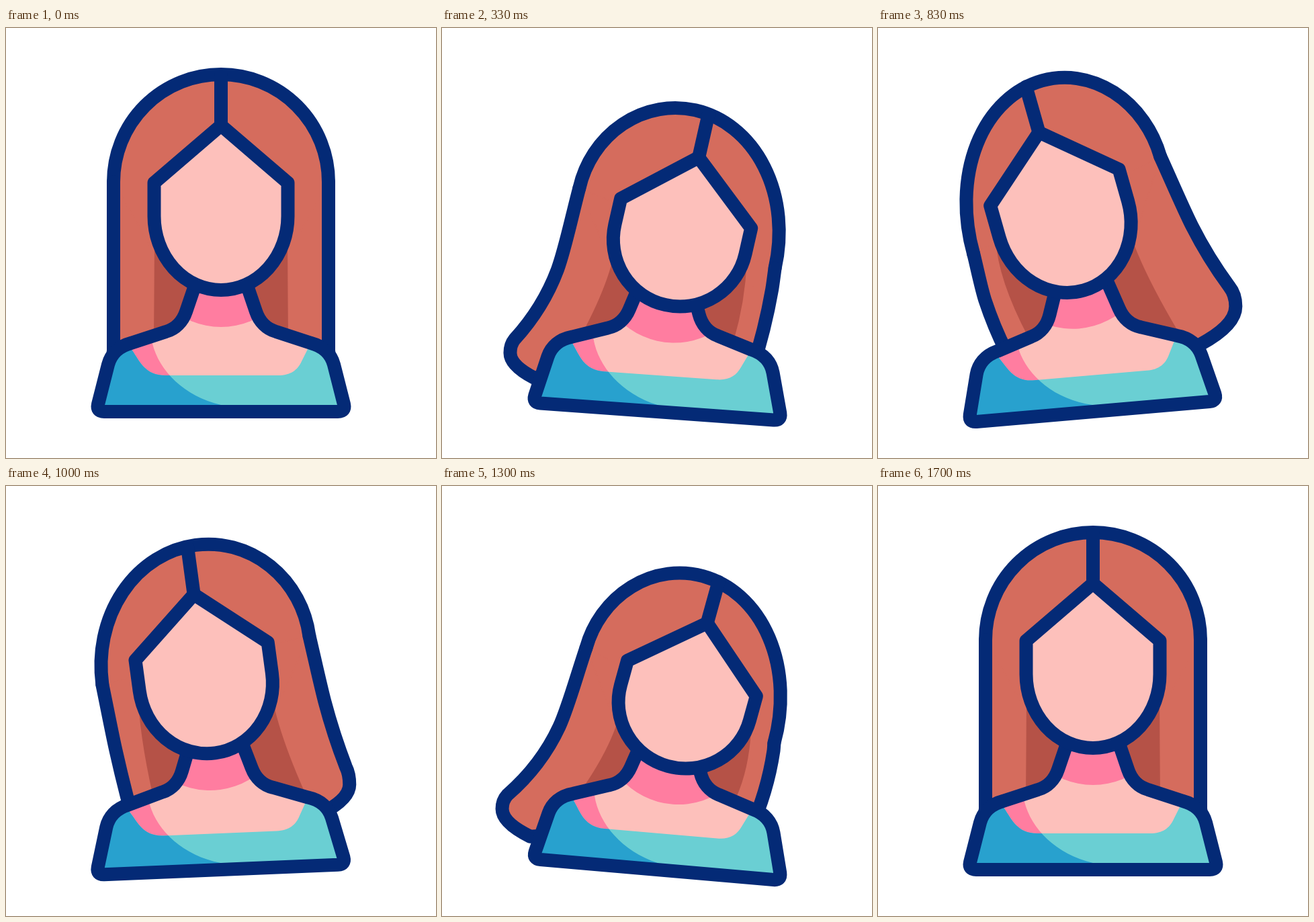
Recreate the animation shown at these times as an HTML page with a canvas. Size 640 px wide and 640 px high, loop 2000 ms.

```html
<!DOCTYPE html>
<html lang="en">
<head>
<meta charset="utf-8">
<title>Head sway</title>
<style>
  html, body { margin: 0; width: 100%; height: 100%; overflow: hidden; background: #fff; }
  canvas { display: block; width: 100vw; height: 100vh; }
</style>
</head>
<body>
<canvas id="stage" width="640" height="640"></canvas>
<script>
const ctx = document.getElementById('stage').getContext('2d');
const NAVY = '#042a76', HAIR = '#d56c5d', SHADE = '#b55247', SKIN = '#fdc0bb';
const PINK = '#ff7da0', TEAL = '#6acfd3', BLUE = '#28a1ce';
const LOOP = 2000, STEP = 100 / 3;

// head: tilt, pivot x, pivot y, nod; strands: middle, tip, outermost point,
// hidden end; shade: lower corners
const REST = {
  head: [0, 320, 385, 0], body: [0],
  left: [160, 365, 160, 480, 159, 497, 165, 515],
  right: [480, 365, 480, 480, 481, 497, 475, 515],
  shade: [220, 462, 420, 462]
};
const RIGHT = {
  head: [16, 331.2, 437.2, 25], body: [5.15],
  left: [175, 358, 95, 459, 87, 480, 130, 522],
  right: [494, 395, 457, 515, 450, 532, 440, 535],
  shade: [203, 458, 438, 465]
};
const LEFT = {
  head: [-16.5, 304.6, 385.1, 0], body: [-5.15],
  left: [159, 406, 237, 556, 241, 573, 190, 560],
  right: [467, 293, 524, 382, 534, 412, 480, 470],
  shade: [224, 460, 446, 450]
};
const KEYS = [[10, REST], [464, RIGHT], [867, LEFT], [1256, RIGHT], [1645, REST]];

function mix(a, b, w) {
  const pose = {};
  for (const part in a) pose[part] = a[part].map((v, i) => v + (b[part][i] - v) * w);
  return pose;
}

function poseAt(t) {
  if (t <= KEYS[0][0]) return REST;
  for (let i = 1; i < KEYS.length; i++) {
    const [t0, a] = KEYS[i - 1], [t1, b] = KEYS[i];
    if (t < t1) {
      const s = (t - t0) / (t1 - t0);
      return mix(a, b, s * s * (3 - 2 * s));
    }
  }
  return REST;
}

function fill(path, color) {
  ctx.fillStyle = color;
  ctx.fill(path);
}

function stroke(path) {
  ctx.strokeStyle = NAVY;
  ctx.lineWidth = 20;
  ctx.lineJoin = ctx.lineCap = 'round';
  ctx.stroke(path);
}

function moved(path, m) {
  const out = new Path2D();
  out.addPath(path, m);
  return out;
}

// One side of the hair, from the end of the dome to the hidden end
function strand([ex, ey], [mx, my, tx, ty, hx, hy, gx, gy]) {
  const upper = Math.hypot(mx - ex, my - ey), lower = Math.hypot(tx - mx, ty - my);
  let ux = 2 * (mx - ex) / upper + (tx - mx) / lower;
  let uy = 2 * (my - ey) / upper + (ty - my) / lower;
  const len = Math.hypot(ux, uy);
  ux /= len;
  uy /= len;
  const k = upper * 0.25, q = lower / 2;
  const path = new Path2D();
  path.moveTo(ex, ey);
  path.bezierCurveTo(ex + (mx - ex) / 3, ey + (my - ey) / 3, mx - ux * k, my - uy * k, mx, my);
  path.quadraticCurveTo(mx + ux * q, my + uy * q, tx, ty);
  path.quadraticCurveTo(hx, ty + 0.4 * (hy - ty), hx, hy);
  path.quadraticCurveTo(hx, (hy + gy) / 2, gx, gy);
  path.lineTo(320, 510);
  return path;
}

const BODY = new Path2D(
  'M284 375 L268 422 C263 437 252 448 238 452 L186 469 C167 474 156 486 152 501' +
  ' L137 560 Q134.5 571 146 571 H494 Q505.5 571 503 560 L488 501' +
  ' C484 486 473 474 454 469 L402 452 C388 448 377 437 372 422 L356 375');
const SHIRT = new Path2D(
  'M130 460 H176 L188 480 C199 496 207 517 237 517 H405 C424 517 434 509 440 496 L451 474' +
  ' L456 460 H520 V580 H120 Z');
const SHADOW = new Path2D(
  'M217 460 Q217 466 218 470 C228 510 265 548 320 561 V580 H110 V460 Z');

function drawHair(m, pose) {
  const [a, , , nod] = pose.head;
  const turn = Math.abs(a), dir = a < 0 ? -1 : 1;
  const near = 160 - 0.75 * turn - 0.02 * turn * turn, far = 160 + 0.25 * turn;
  const apex = 1.6 * turn, top = 160 - 0.3 * nod - 0.2 * turn, low = 4 * turn;
  const at = (x, y) => { const p = m.transformPoint(new DOMPoint(x, y)); return [p.x, p.y]; };

  // the dome is drawn for a tilt to the right and mirrored for the left
  const cap = new Path2D();
  cap.ellipse(-apex, -6, far - apex, top, 0, Math.PI, Math.PI * 1.5);
  cap.ellipse(-apex, low - 6, near + apex, top + low, 0, Math.PI * 1.5, Math.PI * 2);
  const dome = moved(cap, m.scale(dir, 1));

  const farEnd = at(-dir * far, -6), nearEnd = at(dir * near, low - 6);
  const [farSide, nearSide] = a < 0 ? [pose.right, pose.left] : [pose.left, pose.right];
  const sides = [strand(farEnd, farSide), strand(nearEnd, nearSide)];
  const middle = new Path2D();
  middle.moveTo(...farEnd);
  middle.lineTo(...nearEnd);
  middle.lineTo(320, 510);
  middle.closePath();

  for (const shape of [dome, middle, ...sides]) fill(shape, HAIR);
  // closes hairline seams between the filled pieces
  ctx.strokeStyle = HAIR;
  ctx.lineWidth = 2;
  ctx.stroke(middle);

  const [lx, ly, rx, ry] = pose.shade;
  const [ax, ay] = at(-99 + 0.4 * a, 45), [bx, by] = at(99 + 0.4 * a, 45);
  const lean = -0.2 * a;
  const shade = new Path2D();
  shade.moveTo(ax, ay);
  shade.quadraticCurveTo(ax + lean, ay + 60, lx, ly);
  shade.lineTo(rx, ry);
  shade.quadraticCurveTo(bx + lean, by + 60, bx, by);
  shade.closePath();
  fill(shade, SHADE);

  stroke(dome);
  sides.forEach(stroke);

  const part = new Path2D();
  part.moveTo(0, -90);
  part.lineTo(0, -4 - top);
  stroke(moved(part, m));
}

function drawBody(m, pose) {
  const turn = new DOMMatrix().translate(320, 571).rotate(pose.body[0]).translate(-320, -571);
  const [body, shirt, shadow] = [BODY, SHIRT, SHADOW].map(p => moved(p, turn));
  const chin = new Path2D();
  chin.arc(0, 95 - pose.head[3], 115, 0, Math.PI * 2);

  ctx.save();
  ctx.clip(body);
  fill(body, SKIN);
  fill(shadow, PINK);
  fill(moved(chin, m), PINK);
  fill(shirt, TEAL);
  ctx.clip(shirt);
  fill(shadow, BLUE);
  ctx.restore();
  stroke(body);
}

function drawFace(m, nod) {
  const shape = new Path2D();
  shape.moveTo(0, -90);
  shape.lineTo(99.5, -4.6);
  shape.ellipse(0, 45 - nod / 2, 99.5, 110 - nod / 2, 0, 0, Math.PI);
  shape.lineTo(-99.5, -4.6);
  shape.closePath();
  const face = moved(shape, m);
  fill(face, SKIN);
  stroke(face);
}

function draw(t) {
  const pose = poseAt(t);
  const [tilt, px, py, nod] = pose.head;
  const m = new DOMMatrix().translate(px, py).rotate(tilt).translate(0, -150);
  ctx.fillStyle = '#fff';
  ctx.fillRect(0, 0, 640, 640);
  drawHair(m, pose);
  drawBody(m, pose);
  drawFace(m, nod);
}

const begin = performance.now();
function tick() {
  const t = (performance.now() - begin) % LOOP;
  draw(Math.floor((t + 4) / STEP) * STEP);
  requestAnimationFrame(tick);
}
tick();
</script>
</body>
</html>
```
